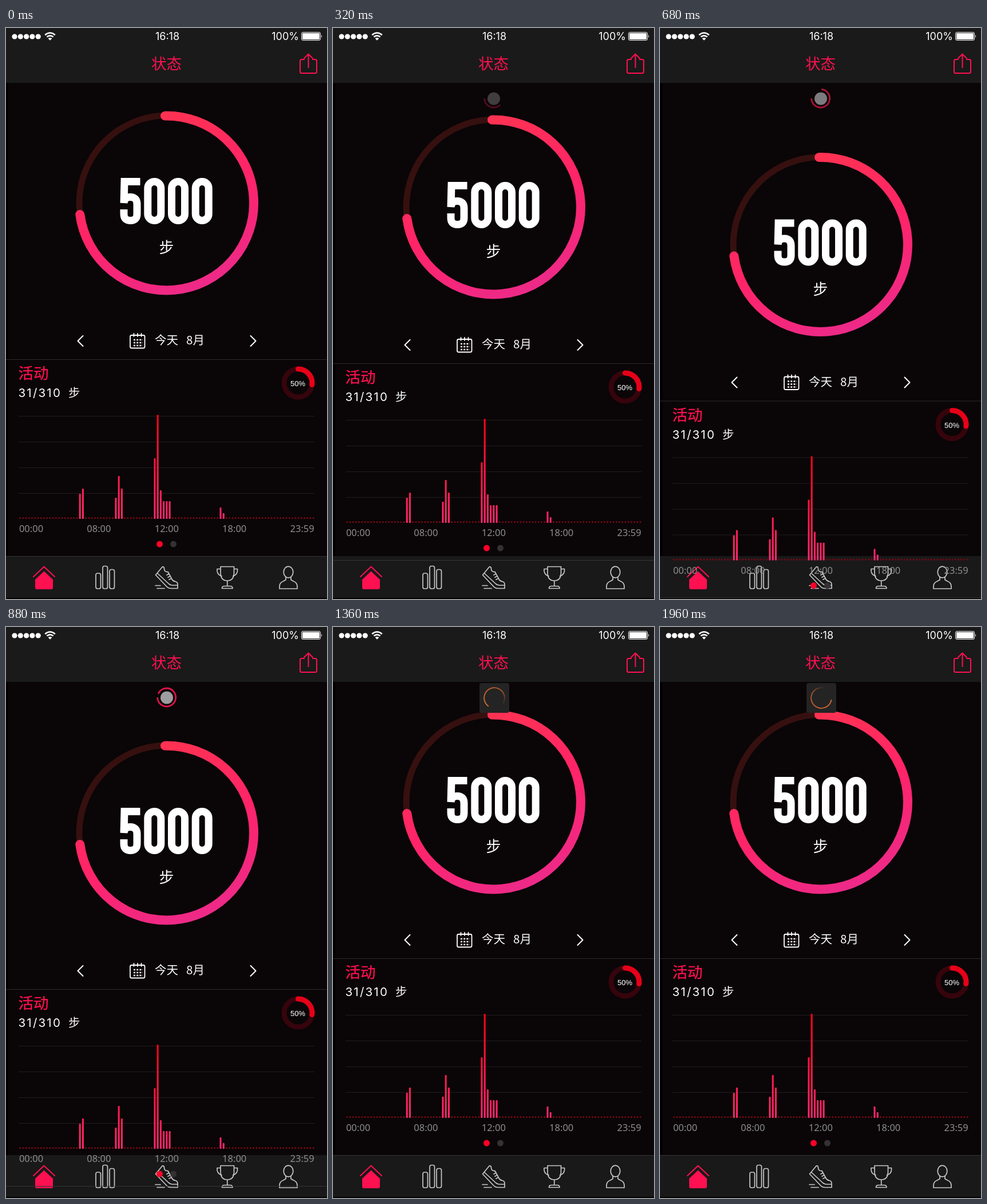
Recreate the animation shown at these times as an HTML page. Size 561 by 998 pixels, loop 2 s.

```html
<!DOCTYPE html>
<html lang="zh-CN">
<head>
<meta charset="utf-8">
<title>状态</title>
<style>
html, body { margin: 0; width: 100%; height: 100%; overflow: hidden; background: #000; }
svg { position: absolute; left: 0; top: 0; }
text { font-family: "Noto Sans CJK SC", "Noto Sans CJK", "Noto Sans", sans-serif; fill: #fff; }
.num { font-family: Inter, sans-serif; }
.line { fill: none; stroke-linecap: round; stroke-linejoin: round; }
.pink { fill: #ff1050; }
#loader { position: absolute; left: 256px; top: 98px; width: 52px; height: 52px; border-radius: 4px; background: #242424; }
#spin {
  position: absolute; left: 7px; top: 7px; width: 38px; height: 38px; border-radius: 50%;
  background: conic-gradient(#d4682e, #a9552b 190deg, #5a3424 245deg, transparent 280deg);
  -webkit-mask: radial-gradient(circle, transparent 16.5px, #000 17.2px);
  mask: radial-gradient(circle, transparent 16.5px, #000 17.2px);
}
</style>
</head>
<body>
<svg width="561" height="998" viewBox="0 0 561 998">
  <defs>
    <linearGradient id="ringFill" gradientUnits="userSpaceOnUse" x1="215" y1="165" x2="345" y2="460">
      <stop stop-color="#ff3350"/><stop offset=".5" stop-color="#ff2468"/><stop offset="1" stop-color="#ec2a8a"/>
    </linearGradient>
    <linearGradient id="barFill" gradientUnits="userSpaceOnUse" x1="0" y1="676" x2="0" y2="858">
      <stop stop-color="#ff0018"/><stop offset="1" stop-color="#ff2a70"/>
    </linearGradient>
  </defs>

  <rect x="4" y="96" width="557" height="828" fill="#0a0507"/>
  <rect width="561" height="96" fill="#1a1a1a"/>
  <rect y="923" width="561" height="73" fill="#191919"/>

  <!-- status bar and title -->
  <g id="signal" fill="#fff"></g>
  <path class="line" stroke="#fff" stroke-width="2.6" style="stroke-linecap:butt" d="M68.2 12.2q8.8-7.4 17.6 0M71.4 15.6q5.6-4.6 11.2 0"/>
  <path d="M73.6 18.2q3.4-2.6 6.8 0L77 21.8Z" fill="#fff"/>
  <text class="num" x="282" y="21" font-size="18" text-anchor="middle">16:18</text>
  <text class="num" x="512" y="20.5" font-size="18" text-anchor="end">100%</text>
  <rect x="516.5" y="7.5" width="33" height="14" rx="2.5" fill="none" stroke="#fff"/>
  <rect x="518" y="9" width="30" height="11" rx="1" fill="#fff"/>
  <path d="M551 12q2 2.5 0 5Z" fill="#fff"/>
  <text class="pink" x="280.5" y="72" font-size="26.5" text-anchor="middle">状态</text>
  <path class="line" stroke="#ff1050" stroke-width="2" d="M521 55h-4.5q-2.5 0-2.5 2.5V76.5q0 2.5 2.5 2.5h24q2.5 0 2.5-2.5V57.5q0-2.5-2.5-2.5H536M528.5 69V46M521 53l7.5-7.5 7.5 7.5"/>

  <!-- tab icons -->
  <path class="line" stroke="#ff1050" stroke-width="2" d="M48 959L66.5 941.5 85 959"/>
  <path class="pink" d="M51 964L66.5 949.5 82 964V978q0 3-3 3H54q-3 0-3-3Z"/>
  <g class="line" stroke="#c8c8c8" stroke-width="1.7">
    <rect x="157" y="953" width="8.5" height="27" rx="3"/>
    <rect x="169" y="940.5" width="8.5" height="39.5" rx="3"/>
    <rect x="181" y="946.5" width="8.5" height="33.5" rx="3"/>
    <path d="M261.5 956L273.5 941.5q3 0 3 3.500q0 6 6.500 5.500l7 13q2 3.500 6 4 4 1 4 5v7h-12q-4 0-7-3ZM264.500 953L284.500 971.500q3 2.500 6 2.500h9.500M281 956l4-2M283 960l4-2M285 964l4-2M261 974.500h9M264 979.500h13"/>
    <path d="M375 941.5h23.5V952q0 14-11.75 14T375 952ZM375 945.5h-6q-1 10 8 12.5M398.500 945.5h6q1 10-8 12.5M386.750 966v9M377.500 979.500q0-4 4-4h10.500q4 0 4 4Z"/>
    <ellipse cx="493.5" cy="951" rx="8.3" ry="9.800"/>
    <path d="M489 960v4.500l-4.500 2.500q-6.500 2.500-6.500 9v4h31v-4q0-6.500-6.500-9l-4.500-2.500V960"/>
  </g>

  <!-- pulled content -->
  <g id="page">
    <path d="M0 579.5H561" stroke="#2c2a2b"/>
    <path d="M0 923.5H561" stroke="#343434"/>
    <circle cx="281" cy="306" r="153" fill="none" stroke="#35100f" stroke-width="11"/>
    <path class="line" stroke="url(#ringFill)" stroke-width="16" d="M278 153.5A152.5 152.5 0 1 1 129.3 326"/>
    <g role="img" aria-label="5000" fill="none" stroke="#fff" stroke-width="13">
      <path d="M234.5 268.5H207L206 306Q207 295.5 217 295.5 229 295.5 229 308V325Q229 336.5 217.5 336.5 206 336.5 206 325V317"/>
      <rect x="247.8" y="268.5" width="23" height="68" rx="11.5"/>
      <rect x="289.5" y="268.5" width="23" height="68" rx="11.5"/>
      <rect x="331.2" y="268.5" width="23" height="68" rx="11.5"/>
    </g>
    <text x="280.5" y="393" font-size="26" text-anchor="middle">步</text>

    <g class="line" stroke="#fff" stroke-width="2">
      <path d="M134.5 538L125.5 547l9 9M427.5 538l9 9-9 9"/>
      <rect x="217" y="537" width="25.5" height="22.5" rx="2.5" stroke-width="1.8"/>
      <path d="M223.5 534v5M230 534v5M236.5 534v5" stroke-width="1.8"/>
      <path d="M223 545H239M223 550H239M223 555H239" stroke-width="2.6" stroke-dasharray="3 2.2" style="stroke-linecap:butt"/>
    </g>
    <text x="260" y="553" font-size="20.5">今天</text>
    <text x="315" y="553" font-size="20.5">8月</text>

    <text class="pink" x="21.5" y="613" font-size="26.5" font-weight="500" stroke="#ff1050" stroke-width=".3">活动</text>
    <text class="num" x="21.5" y="645" font-size="20.5" letter-spacing="2.2">31/310</text>
    <text x="109" y="645" font-size="20.5">步</text>
    <circle cx="510.5" cy="620.5" r="24.5" fill="none" stroke="#36040c" stroke-width="9"/>
    <path class="line" stroke="#e60018" stroke-width="9" d="M510.5 596A24.5 24.5 0 0 1 534.8 623.5"/>
    <text x="510" y="626" font-size="13" text-anchor="middle" style="font-family:'Liberation Sans',Arial,sans-serif">50%</text>

    <path d="M22 678.5H539M22 723.5H539M22 768.5H539M22 813.5H539" stroke="#211d1e"/>
    <path class="line" d="M24.6 856.5H538" stroke="#7c0714" stroke-width="3" stroke-dasharray="0 5.23"/>
    <g id="bars" fill="url(#barFill)"></g>
    <g id="hours"></g>
    <circle cx="268.5" cy="902" r="5.5" fill="#ff0028"/>
    <circle cx="292.5" cy="902" r="5.5" fill="#333132"/>
  </g>

  <g id="pull">
    <circle cx="281" cy="123.5" r="11" fill="#b2b2b6"/>
    <path id="arc" d="M264.7 123a16 16 0 1 0 32 0a16 16 0 1 0-32 0" pathLength="360" fill="none" stroke="#fa1750" stroke-width="2.8"/>
  </g>
</svg>
<div id="loader"><div id="spin"></div></div>

<script>
const $ = id => document.getElementById(id);
const LOOP = 2000, STEP = 40, LOAD_AT = 1120;

$('signal').innerHTML = [0, 1, 2, 3, 4]
  .map(i => `<circle cx="${15 + i * 10.3}" cy="15" r="4.6"/>`).join('');

// time slot and top of each bar
const bars = [[20, 814], [21, 805], [32, 821], [33, 783], [34, 805], [45, 752], [46, 676],
  [47, 808], [48, 827], [49, 827], [50, 827], [67, 838], [68, 848]];
$('bars').innerHTML = bars
  .map(([n, y]) => `<rect x="${23.1 + n * 5.23}" y="${y}" width="3" height="${858 - y}" rx="1"/>`).join('');

$('hours').innerHTML = ['00:00', '08:00', '12:00', '18:00', '23:59']
  .map((s, i) => `<text x="${44 + i * 118.4}" y="881" font-size="16.5" text-anchor="middle" ` +
    `style="font-family:'Noto Sans',sans-serif;fill:#8e8e8e">${s}</text>`).join('');

// pull distance over time, joined by a smooth curve
const path = [[0, 0], [160, 1.2], [320, 7], [480, 23], [560, 43], [680, 72.5],
  [760, 70], [880, 54], [1000, 30], [1120, 0]];

function slope(i) {
  const a = path[i - 1], b = path[i + 1];
  return a && b && path[i][1] < 72 ? (b[1] - a[1]) / (b[0] - a[0]) : 0;
}

function pullAt(t) {
  const i = path.findIndex(p => p[0] > t);
  if (i < 1) return 0;
  const [t0, y0] = path[i - 1], [t1, y1] = path[i];
  const d = t1 - t0, u = (t - t0) / d, v = 1 - u;
  return v * v * (1 + 2 * u) * y0 + u * u * (3 - 2 * u) * y1
    + d * u * v * (v * slope(i - 1) - u * slope(i));
}

function draw() {
  const t = Math.floor(performance.now() % LOOP / STEP) * STEP;
  const loading = t >= LOAD_AT;
  $('page').setAttribute('transform', `translate(0 ${pullAt(t).toFixed(2)})`);
  $('pull').setAttribute('opacity', loading ? 0 : Math.min(1, t / 1000));
  $('arc').setAttribute('stroke-dasharray', `${Math.min(360, 20 + t * .36)} 400`);
  $('loader').style.display = loading ? 'block' : 'none';
  $('spin').style.transform = `rotate(${215 + (t - 1360) * 360 / (LOOP - LOAD_AT)}deg)`;
  requestAnimationFrame(draw);
}
draw();
</script>
</body>
</html>
```
